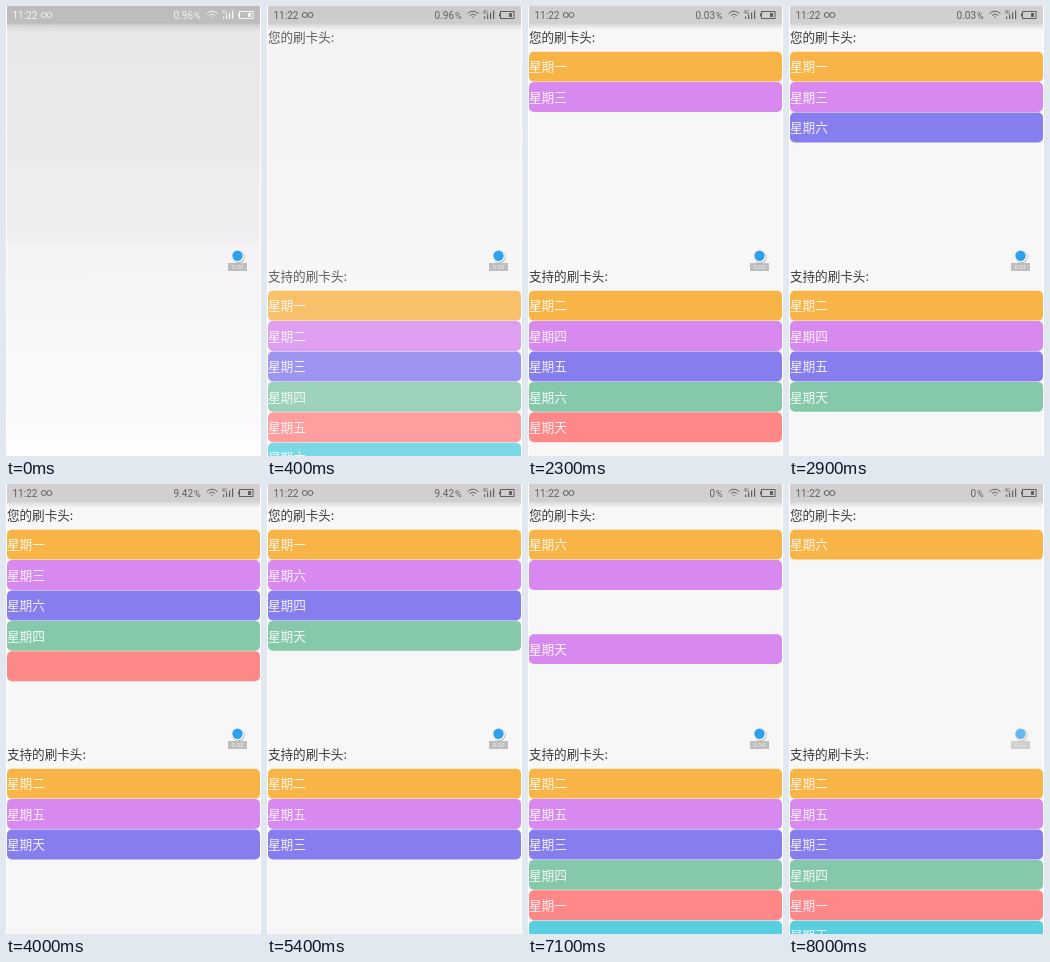
An HTML page with a canvas for the animation above (8.1 s loop, 255 px wide and 450 px high).

```html
<!DOCTYPE html>
<html lang="zh-CN">
<head>
<meta charset="utf-8">
<style>
html, body { margin: 0; width: 255px; height: 450px; overflow: hidden; background: #fff; }
canvas { display: block; }
</style>
</head>
<body>
<canvas id="stage" width="255" height="450"></canvas>
<script>
const ctx = document.getElementById('stage').getContext('2d');
const LOOP = 8100, PITCH = 30.4, TOP_Y = 45.7, BOTTOM_Y = 284.7;
const FLY_START = 86, FLY_END = 470;
const CJK = '"Noto Sans CJK SC", "Noto Sans CJK", sans-serif';
const LATIN = 'Roboto, sans-serif';
const COLORS = ['#f9ad35', '#d47eef', '#7b71ee', '#7bc5a2', '#ff7c7d', '#49cddd', '#f9ad35'];
// [start time, day that changes list]
const MOVES = [[1100, '一'], [1800, '三'], [2400, '六'], [3300, '四'], [4000, '天'],
               [4630, '三'], [5430, '四'], [6100, '一'], [6900, '天']];
const LOAD = [[0, '0.96'], [800, '0.03'], [3800, '9.42'], [6800, '0']];
const SPEED = [[0, '0.00'], [2800, '0.01'], [3800, '0.02'], [5400, '0.00'], [6300, '0.34'], [7400, '0.00']];

const valueAt = (steps, t) => steps.filter(s => s[0] <= t).pop()[1];
const ease = p => (1 - Math.cos(Math.PI * p)) / 2;

function text(str, x, y, size, color, family = CJK, align = 'left') {
  ctx.font = `${size}px ${family}`;
  ctx.fillStyle = color;
  ctx.textAlign = align;
  ctx.textBaseline = 'alphabetic';
  ctx.fillText(str, x, y);
}

function row(y, color, day) {
  ctx.globalAlpha = 0.9;
  ctx.fillStyle = color;
  ctx.beginPath();
  ctx.roundRect(1, y, 253, 29.9, 5);
  ctx.fill();
  if (day) text('星期' + day, 0.9, y + 19.7, 12.7, '#fff');
  ctx.globalAlpha = 1;
}

function stateAt(t) {
  const lists = [[], [...'一二三四五六天']];
  for (const [start, day] of MOVES) {
    if (t < start) break;
    const from = lists[0].includes(day) ? 0 : 1;
    const source = lists[from], target = lists[1 - from];
    const index = source.indexOf(day);
    if (t < start + FLY_END) {
      const p = (t - start - FLY_START) / (FLY_END - FLY_START);
      const fly = { day, from, index, to: target.length, p };
      target.push('');
      if (p >= 0) source[index] = '';
      return { lists, fly };
    }
    source.splice(index, 1);
    target.push(day);
  }
  return { lists };
}

function page(t) {
  ctx.fillStyle = '#f8f7f8';
  ctx.fillRect(1, 0, 253, 450);
  text('您的刷卡头:', 0.9, 36.2, 12.6, '#3a3a3a');
  text('支持的刷卡头:', 0.9, 275.2, 12.6, '#3a3a3a');
  const { lists, fly } = stateAt(t);
  const bases = [TOP_Y, BOTTOM_Y];
  lists.forEach((days, n) => days.forEach((day, i) => row(bases[n] + i * PITCH, COLORS[i], day)));
  if (fly && fly.p >= 0) {
    const y0 = bases[fly.from] + fly.index * PITCH;
    const y1 = bases[1 - fly.from] + fly.to * PITCH;
    row(y0 + (y1 - y0) * ease(fly.p), COLORS[fly.index], fly.day);
  }
}

function gradient(y0, y1, stops) {
  const g = ctx.createLinearGradient(0, y0, 0, y1);
  stops.forEach(([y, color]) => g.addColorStop((y - y0) / (y1 - y0), color));
  ctx.fillStyle = g;
  ctx.fillRect(1, y0, 253, y1 - y0);
}

function opening(alpha) {
  ctx.globalAlpha = alpha;
  gradient(0, 450, [[0, '#bfbcbf'], [17, '#bfbcbf'], [20, '#d8d6d8'], [26, '#e9e7e9'], [154, '#ebe9eb'],
    [156, '#eeecee'], [235, '#f0eef0'], [237, '#f5f3f5'], [314, '#f6f5f7'], [317, '#f9f8f9'],
    [405, '#faf9fa'], [430, '#fefbfe'], [450, '#fff']]);
  ctx.globalAlpha = 1;
}

function statusBar(t, color) {
  text('11:22', 6.5, 12.5, 10, color, LATIN);
  text(valueAt(LOAD, t), 187, 12.5, 10, color, LATIN, 'right');
  text('%', 188, 12.5, 9, color, LATIN);
  ctx.strokeStyle = ctx.fillStyle = color;
  ctx.lineWidth = 1;
  for (const x of [37.8, 43.4]) {
    ctx.beginPath();
    ctx.arc(x, 9, 2.5, 0, 7);
    ctx.stroke();
  }
  for (const r of [1, 3.8, 6.8]) {
    ctx.beginPath();
    ctx.arc(206, 12, r, -Math.PI * 0.8, -Math.PI * 0.2);
    ctx.stroke();
  }
  for (let i = 0; i < 4; i++) ctx.fillRect(217 + i * 3, 10.5 - i * 2, 1.2, 2.5 + i * 2);
  text('4G', 215.5, 8, 4.5, color, LATIN);
  ctx.strokeRect(233.5, 5.5, 13.5, 7);
  ctx.fillRect(232, 7.5, 1, 3);
  ctx.fillRect(242, 7, 3, 4);
}

function floater(t) {
  ctx.globalAlpha = t >= 8000 ? 0.7 : 1;
  const discs = [[232.5, 251, 6.2, '#b4b4b4'], [231.9, 250.3, 6.1, '#fff'], [231.5, 249.8, 5.2, '#2f9ff0']];
  for (const [x, y, r, color] of discs) {
    ctx.fillStyle = color;
    ctx.beginPath();
    ctx.arc(x, y, r, 0, 7);
    ctx.fill();
  }
  ctx.fillStyle = 'rgba(0,0,0,.23)';
  ctx.fillRect(222, 257, 19, 8);
  text(valueAt(SPEED, t), 231.5, 263.3, 6, '#eee', LATIN, 'center');
  ctx.globalAlpha = 1;
}

function draw(now) {
  const t = now % LOOP;
  ctx.clearRect(0, 0, 255, 450);
  page(t);
  gradient(0, 24, [[0, '#d1cfd1'], [17, '#d1cfd1'], [20, '#e5e4e5'], [24, '#f8f7f8']]);
  if (t < 500) opening(1 - t / 500);
  statusBar(t, t < 250 ? '#f4f4f4' : '#606060');
  floater(t);
  requestAnimationFrame(draw);
}
requestAnimationFrame(draw);
</script>
</body>
</html>
```
